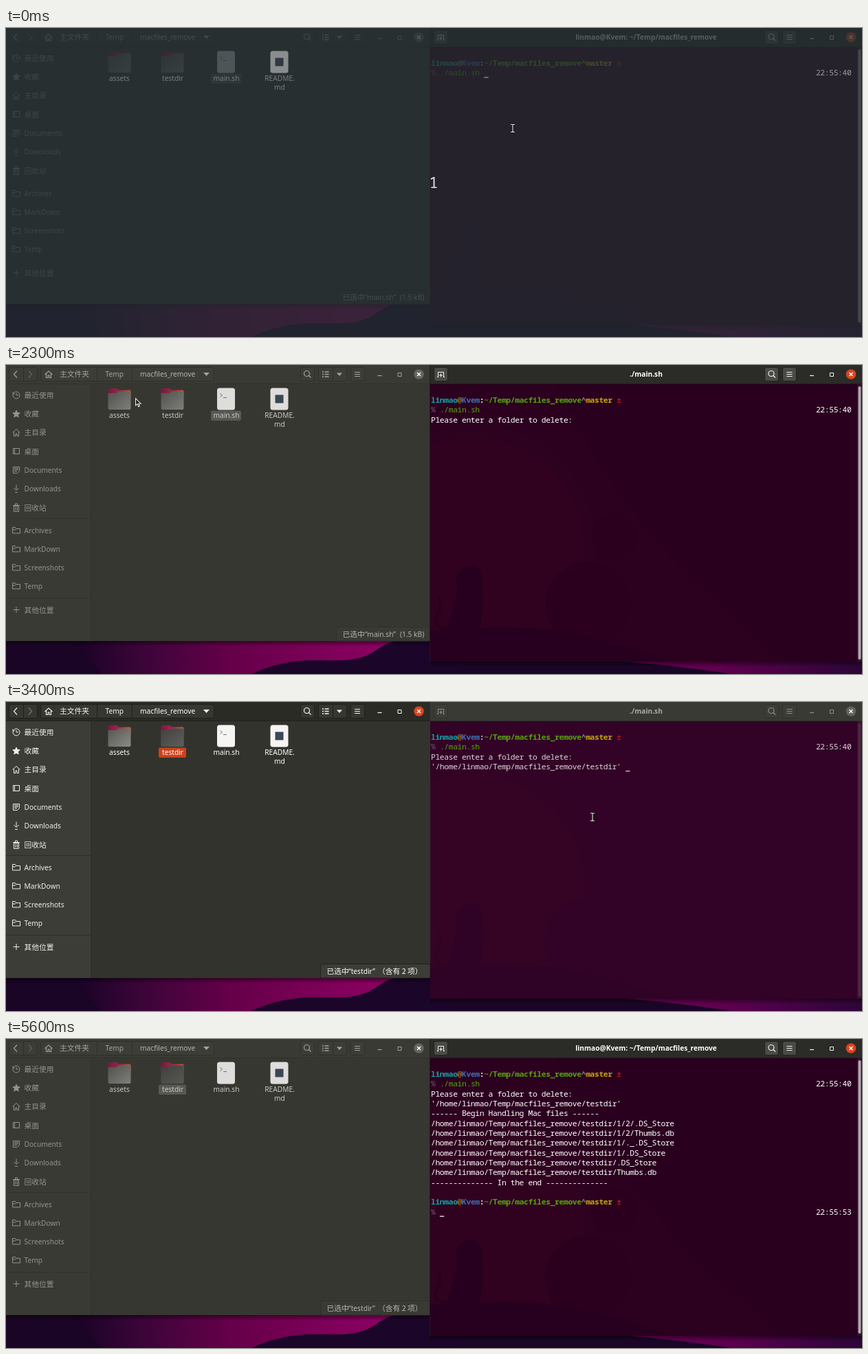
An HTML page that plays this animation: 1245x450 px, repeating every 6 s.

```html
<!DOCTYPE html>
<html lang="zh">
<head>
<meta charset="utf-8">
<title>macfiles_remove</title>
<style>
html, body { margin: 0; width: 100%; height: 100%; overflow: hidden; background: #1a0526; }
svg { display: block; width: 1245px; height: 450px; }
text { font: 10.2px "Noto Sans", "Noto Sans CJK SC", "Noto Sans CJK", sans-serif; white-space: pre; }
.cjk { font-size: 10.75px; font-family: "Noto Sans CJK SC", "Noto Sans CJK", sans-serif; }
.b { font-weight: 700; }
.mono { font: 11.4px "Noto Sans Mono", monospace; letter-spacing: -.404px; }
.mono .b { font-weight: 700; }
.count { font: 21.5px "Noto Sans Mono", monospace; }
</style>
</head>
<body>
<svg id="stage" viewBox="0 0 1245 450">
  <defs>
    <linearGradient id="glow" gradientUnits="userSpaceOnUse" x1="110" y1="440" x2="540" y2="410">
      <stop offset="0" stop-color="#1c0327"/><stop offset=".2" stop-color="#3a0538"/>
      <stop offset=".5" stop-color="#650049"/><stop offset="1" stop-color="#8b0061"/>
    </linearGradient>
    <linearGradient id="glow2" gradientUnits="userSpaceOnUse" x1="890" y1="0" x2="1245" y2="0">
      <stop offset="0" stop-color="#750059"/><stop offset=".45" stop-color="#5c004d"/><stop offset="1" stop-color="#2c0638"/>
    </linearGradient>
    <linearGradient id="tab" x1="0" x2="1"><stop offset="0" stop-color="#801445"/><stop offset=".55" stop-color="#a52c4a"/><stop offset="1" stop-color="#e35a33"/></linearGradient>
    <linearGradient id="body" x1="0" y1="0" x2="1" y2="1"><stop offset="0" stop-color="#565654"/><stop offset="1" stop-color="#8a8a86"/></linearGradient>
    <linearGradient id="shade" x1="0" y1="0" x2="0" y2="1"><stop offset="0" stop-color="#000" stop-opacity=".45"/><stop offset="1" stop-color="#000" stop-opacity="0"/></linearGradient>
    <clipPath id="screen"><rect x="617" y="28" width="628" height="404"/></clipPath>
  </defs>
  <g id="scene"></g>
</svg>
<script>
const LOOP = 6000, STEP = 100;
const USER = 'linmao', HOST = 'Kvem';
const DIR = `/home/${USER}/Temp/macfiles_remove/testdir`;
const CW = 6.436, LH = 14.33, TX = 618;
const scene = document.getElementById('scene');

const clamp = v => Math.max(0, Math.min(1, v));
const ramp = (t, a, b) => clamp((t - a) / (b - a));
const mix = (a, b, k) => '#' + [1, 3, 5].map(i => {
  const p = parseInt(a.substr(i, 2), 16), q = parseInt(b.substr(i, 2), 16);
  return Math.round(p + (q - p) * k).toString(16).padStart(2, '0');
}).join('');
const rect = (x, y, w, h, fill, r = 0, more = '') =>
  `<rect x="${x}" y="${y}" width="${w}" height="${h}" rx="${r}" fill="${fill}" ${more}/>`;
const text = (x, y, s, fill, cls = '', anchor = 'start') =>
  `<text x="${x}" y="${y}" fill="${fill}" class="${cls}" text-anchor="${anchor}">${s}</text>`;
const path = (d, c, w = 1, fill = 'none') =>
  `<path d="${d}" fill="${fill}" stroke="${c}" stroke-width="${w}"/>`;
const group = (s, o) => `<g opacity="${o}">${s}</g>`;
const disc = (x, y, r, fill) => `<circle cx="${x}" cy="${y}" r="${r}" fill="${fill}"/>`;

function wallpaper() {
  return rect(0, 0, 1245, 450, '#1a0526') +
    path('M95 400H620V450H140Q120 430 95 400Z', 'none', 0, 'url(#glow)') +
    path('M354 451C385 437 415 430 447 430C485 430 500 432 522 424C540 417 548 405 567 402H660V451Z', 'none', 0, '#1b0529') +
    path('M888 431Q965 436 1062 451H1245V431Z', 'none', 0, 'url(#glow2)');
}

// Title bar glyphs
const button = (x, w, bg, line) => rect(x + .5, 3.5, w, 20, bg, 3, `stroke="${line}"`);
const lens = (x, c) => path(`M${x + 2.5} 15.5l3 3M${x + 3.5} 12.5a4 4 0 1 1-8 0a4 4 0 1 1 8 0`, c, 1.2);
const bars = (x, c) => path(`M${x - 4} 10.5h8M${x - 4} 13.5h8M${x - 4} 16.5h8`, c, 1.2);
function controls(x, c, bg, closeColor) {
  return path(`M${x - 3} 15.5h6`, c, 1.2) + path(`M${x + 26.5} 11.5h5v5h-5z`, c) +
    disc(x + 57, 13.5, 7.3, bg) + path(`M${x + 54.5} 11l5 5m0-5l-5 5`, closeColor, 1.4);
}

const PLACES = [
  ['最近使用', 44, 'M20 44a5 5 0 1 1-10 0a5 5 0 1 1 10 0M15 41v3h3M10 39.5v2.5h2.5'],
  ['收藏', 71, 'M15 66l1.5 3.4 3.7.4-2.8 2.5.8 3.7-3.2-1.9-3.2 1.9.8-3.7-2.8-2.5 3.7-.4z', 1],
  ['主目录', 98, 'M9.5 98.5L15 93.5l5.5 5M11.5 97.5v6h2.5v-3.5h2v3.5h2.5v-6'],
  ['桌面', 126, 'M10.5 121.5h9v8h-9zM12.5 121.5v8'],
  ['Documents', 153, 'M10.5 148.5h9v6l-3 3h-6zM12 150.5h6M12 152.5h6M12 154.5h4'],
  ['Downloads', 180, 'M15 174.5v7M11.5 179l3.5 3.5 3.5-3.5M13 185.5h4'],
  ['回收站', 208, 'M11.5 205.5h7v8h-7zM10 204.5h10M13.5 204v-2h3v2M14 207v5M16.5 207v5'],
  ['Archives', 241], ['MarkDown', 268], ['Screenshots', 295], ['Temp', 322],
  ['其他位置', 357, 'M10.5 356.5h9M15 352v9']
];
const folderIcon = y => `M9.5 ${y + 4}v-8.5h4l1.5 2h5.5v6.5zM9.5 ${y - 1}h4l1.5-1.5h5`;
const isLatin = s => /^[\w.]+$/.test(s);

function sidebar(c) {
  return PLACES.map(([name, y, d, solid]) =>
    path(d || folderIcon(y), c, 1, solid ? c : 'none') +
    text(26.5, y + (isLatin(name) ? 3.7 : 4), name, c, isLatin(name) ? '' : 'cjk')).join('');
}

function folder(x, dark) {
  const tab = path(`M${x} 38v-2q0-2 2-2h10.5l3 2.5h15.5q2 0 2 2v8h-33z`, 'none', 0, 'url(#tab)');
  const front = `M${x} 41h12l3.5-2.5h17.5V63q0 2-2 2h-29q-2 0-2-2z`;
  return tab + path(front, 'none', 0, 'url(#body)') + (dark ? path(front, 'none', 0, 'rgba(40,40,38,.45)') : '');
}

const script = () => rect(307, 33.5, 26, 32, '#f6f5f4', 3.5) + path('M311.5 41.5l3 2.5-3 2.5M316 47.5h5', '#77767b');
const readme = () => rect(384.5, 33.5, 26, 32, '#f6f5f4', 3.5) + rect(391.5, 43.5, 12, 12, '#3d4757');

function labels(c) {
  return text(165, 77, 'assets', c, '', 'middle') + text(242.5, 77, 'testdir', c, '', 'middle') +
    text(320.5, 77, 'main.sh', c, '', 'middle') + text(398, 77, 'README.', c, '', 'middle') +
    text(398, 89.5, 'md', c, '', 'middle');
}

function status(picked, bg, edge, c) {
  const x = picked ? 457 : 480;
  const box = path(`M${x + .5} 402v-17q0-3.5 3.5-3.5H617V402z`, edge, 1, bg);
  const lead = text(x + 9.5, 396, '已选中', c, 'cjk');
  return box + lead + (picked
    ? text(498, 395.8, '“testdir”', c) + text(541, 396, '（含有 2 项）', c, 'cjk')
    : text(522, 395.8, '“main.sh”', c) + text(573, 395.8, '(1.5 kB)', c));
}

function files(s) {
  const h = s.files, head = mix('#3a3a35', '#2b2b26', h), edge = mix('#30302b', '#20201c', h);
  const line = mix('#33332e', '#2c2c28', h);
  const btn = mix('#3d3d38', '#373732', h), c = mix('#a2a29e', '#f4f4f2', s.side);
  const win = mix('#a2a29e', '#ffffff', h), side = mix('#3a3a35', '#3d3d38', h);
  const sideText = mix('#929290', '#eeeeec', s.side), label = mix('#c9c9c6', '#ffffff', h);
  const pick = s.drag ? [222, 40] : [298, 44];
  return rect(0, 402, 617, 8, 'url(#shade)') +
    rect(0, 0, 617.5, 402, mix('#373731', '#33332e', h)) + rect(0, 0, 617.5, 27, head) +
    rect(0, 27, 617.5, 1, edge) + rect(0, 28, 123, 374, side) + rect(123, 28, 1, 374, line) +
    rect(0, 223, 123, 1, line) + rect(0, 339, 123, 1, line) +
    button(4, 41, btn, edge) + path('M25.5 4v19', edge) +
    path('M16 8.5l-4.5 5 4.5 5', c, 1.2) + path('M33 8.5l4.5 5-4.5 5', mix('#62625e', '#777772', h), 1.2) +
    button(50, 252, btn, edge) + path('M132.5 4v19M183.5 4v19', edge) +
    path('M56.5 14L62 9l5.5 5M58.5 13v5.5h2.5v-3.5h2v3.5h2.5V13', c, 1.1) +
    text(78, 17, '主文件夹', c, 'cjk') + text(144.5, 16.8, 'Temp', c) +
    text(195, 16.8, 'macfiles_remove', mix('#b4b4b0', '#ffffff', s.side)) +
    path('M287 11h9l-4.5 5z', 'none', 0, c) +
    button(428, 20, btn, edge) + lens(438, c) +
    button(454, 41, btn, edge) + path('M475.5 4v19', edge) + path('M481 11.5h8l-4 4.5z', 'none', 0, c) +
    path('M460 10h2M460 13.5h2M460 17h2M463.5 10h6M463.5 13.5h6M463.5 17h6', c, 1.4) +
    button(501, 20, btn, edge) + bars(511, c) +
    controls(543.5, win, mix('#65655f', '#da451f', h), '#fff') +
    sidebar(sideText) + group(folder(148.5) + folder(225.5, s.drag), .86 + .14 * h) +
    rect(pick[0], 66.5, pick[1], 14.5, mix('#585854', '#cb421c', s.drag ? h : 0), 2) +
    group(script() + readme(), .88 + .12 * h) + labels(label) +
    status(s.picked, side, edge, mix('#b5b5b1', '#ffffff', h));
}

// Terminal rows
const row = (i, s, c, col = 0) => text(TX + col * CW, 55 + LH * i, s, c, 'mono');
const span = (s, c, bold) => `<tspan fill="${c}"${bold ? ' class="b"' : ''}>${s}</tspan>`;
function prompt(i, clock, cmd, white) {
  const who = span(USER, '#14a0a2', 1) + span('@', '#c4900c') + span(HOST, '#3c6fb4', 1) + span(':', white, 1) +
    span('~/Temp/macfiles_remove', '#55a40c', 1) + span('^', '#8a7f88', 1) + span('master ', '#c6a40c', 1) + span('±', '#cf1414', 1);
  return row(i, who, white) + row(i + 1, span('% ', '#75507b') + span(cmd, '#55a40c'), white) + row(i + 1, clock, white, 87);
}
const caret = (i, col, c) => rect(TX + col * CW, 57 + LH * i, 6.4, 1.2, c);

function output(s, white) {
  const out = [prompt(0, '22:55:40', './main.sh', white)];
  if (s.asked) out.push(row(2, 'Please enter a folder to delete:', white));
  if (s.dropped) out.push(row(3, `'${DIR}'`, white));
  if (s.done) {
    ['------ Begin Handling Mac files ------', DIR + '/1/2/.DS_Store', DIR + '/1/2/Thumbs.db', DIR + '/1/._.DS_Store',
      DIR + '/1/.DS_Store', DIR + '/.DS_Store', DIR + '/Thumbs.db', '-------------- In the end --------------']
      .forEach((line, i) => out.push(row(4 + i, line, white)));
    out.push(prompt(13, '22:55:53', '', white));
  }
  if (s.caret) out.push(caret(...s.caret, white));
  return out.join('');
}

const title = (s, c) => text(931, 17, s.asked && !s.done ? './main.sh' : `${USER}@${HOST}: ~/Temp/macfiles_remove`, c, 'b', 'middle');

function backdrop(f) {
  const dark = mix('#2f0326', '#28001f', f);
  return `<g clip-path="url(#screen)">` + rect(617, 28, 628, 404, mix('#320326', '#2c001f', f)) +
    path('M800 28Q900 250 1130 432H1245V28Z', 'none', 0, mix('#320326', '#2a001f', f)) +
    disc(680, 265, 178, mix('#330326', '#2d0120', f)) + disc(678, 268, 163, mix('#350425', '#300220', f)) +
    disc(846, 348, 62, mix('#320326', '#2b001f', f)) + disc(885, 250, 34, mix('#320326', '#2b001f', f)) +
    path('M617 387Q690 380 757 382Q850 390 970 432H617Z', 'none', 0, dark) +
    path('M640 384Q652 350 657 326Q651 314 658 302Q668 290 683 293Q696 300 692 323Q698 350 688 385Z', 'none', 0, dark) +
    path('M644 384Q620 384 626 366Q636 352 629 338', dark, 4) + '</g>';
}

function terminal(s) {
  const f = s.focused, k = s.bar;
  const head = mix('#3a3a35', '#2b2b27', k), edge = mix('#30302b', '#20201c', k), btn = mix('#3d3d38', '#4a4a46', k);
  const c = mix('#8f8f8b', '#f4f4f2', k);
  return rect(617, 432, 628, 8, 'url(#shade)') + (f ? rect(616, 0, 1, 433, '#1d1d1a') : '') +
    backdrop(f) + rect(617, 0, 628, 28, head) + rect(617, 27, 628, 1, edge) +
    button(622, 20, btn, edge) + path('M628.5 17.5v-7h8v7M627 17.5h2M636 17.5h2M632.5 12.5v5M630 15h5', c) +
    button(1103, 20, btn, edge) + lens(1113.5, c) + button(1129, 20, btn, edge) + bars(1139.5, c) +
    controls(1172, c, mix('#62625d', '#da451f', k), '#fff') + title(s, mix('#a9a9a5', '#ffffff', k)) +
    rect(1238, 28, 7, 404, mix('#3a1230', '#351029', f)) + rect(1239.5, 31, 4, 398, mix('#4c2942', '#b5a9b1', f), 2) +
    output(s, mix('#ded3da', '#ffffff', f));
}

// Pointer: [time, x, y]
const MOVES = [
  [1400, 733, 152], [1500, 636, 148], [1600, 423, 127], [1700, 45, 52], [1900, 42, 49], [2000, 39, 41], [2100, 62, 35],
  [2300, 188, 48], [2500, 240, 55], [2600, 264, 60], [2700, 333, 84], [3000, 660, 143], [3200, 840, 167], [3300, 853, 167.5],
  [5000, 853, 167.5], [5200, 700, 122], [5400, 360, 52], [5500, 115, 3]
];
function where(t) {
  if (t < 1400) return [737, 146];
  let i = MOVES.findIndex(m => m[0] > t);
  if (i < 0) i = MOVES.length - 1;
  const [ta, xa, ya] = MOVES[i - 1], [tb, xb, yb] = MOVES[i], k = ramp(t, ta, tb);
  return [xa + (xb - xa) * k, ya + (yb - ya) * k];
}
const SHAPES = {
  beam: ['M-3-5.5h2.2l.8.7.8-.7H3M0-5V5M-3 5.5h2.2l.8-.7.8.7H3', 'none'],
  arrow: ['M.5 .5v10.5l2.5-2.2 1.7 4 1.8-.8-1.7-3.8h3.4z', '#222'],
  hand: ['M-4-1q0-3 2-3q.5-1.5 2-.8q1.5-1 2.3.3q2-.3 2.2 1.5V1q0 2-1.5 4h-5q-1-2-2.8-3.5q-1-1.5.8-1.5z', '#fff']
};
function pointer(t) {
  if ((t >= 1000 && t < 1400) || (t >= 4200 && t < 5000) || t >= 5600) return '';
  const [x, y] = where(t);
  const kind = t >= 2600 && t < 3300 ? 'hand' : x < 617 ? 'arrow' : 'beam';
  const [d, fill] = SHAPES[kind];
  return `<g transform="translate(${x} ${y})">` + path(d, '#111', kind === 'beam' ? 3 : 1.8, 'none') +
    path(d, '#eee', kind === 'hand' ? .3 : 1.1, fill) + '</g>';
}

function caretAt(t) {
  if (t < 1000) return [1, 12];
  if (t < 1200 || (t >= 1900 && t < 2500)) return null;
  if (t < 3300) return [3, 0];
  if (t < 4400) return [3, 44];
  return t >= 4800 && t < 5400 ? null : [14, 2];
}

function stateAt(t) {
  const back = ramp(t, 3400, 3800);
  return {
    files: Math.min(ramp(t, 2500, 2725), 1 - back),
    side: Math.min(ramp(t, 2680, 2900), 1 - back),
    bar: Math.max(1 - ramp(t, 2620, 2900), back),
    focused: t >= 2600 && t < 3500 ? 0 : 1,
    drag: t >= 2600, picked: t >= 2800,
    asked: t >= 1200, dropped: t >= 3300, done: t >= 4400,
    caret: caretAt(t)
  };
}

// Dimmed screen with the last digit of the countdown
function countdown() {
  return rect(0, 0, 1245, 450, '#242d31', 0, 'opacity=".77"') +
    group(readme() + labels('#c9c9c6') + row(1, '22:55:40', '#fff', 87) + caret(1, 12, '#fff'), .35) +
    text(622, 233, '1', '#e6e6e6', 'count', 'middle');
}

function draw(t) {
  const s = stateAt(t);
  scene.innerHTML = wallpaper() + files(s) + terminal(s) + (t < 200 ? countdown() : '') + pointer(t);
}

let last = -1;
function tick() {
  const t = Math.floor(performance.now() % LOOP / STEP) * STEP;
  if (t !== last) draw(last = t);
  requestAnimationFrame(tick);
}
tick();
</script>
</body>
</html>
```
